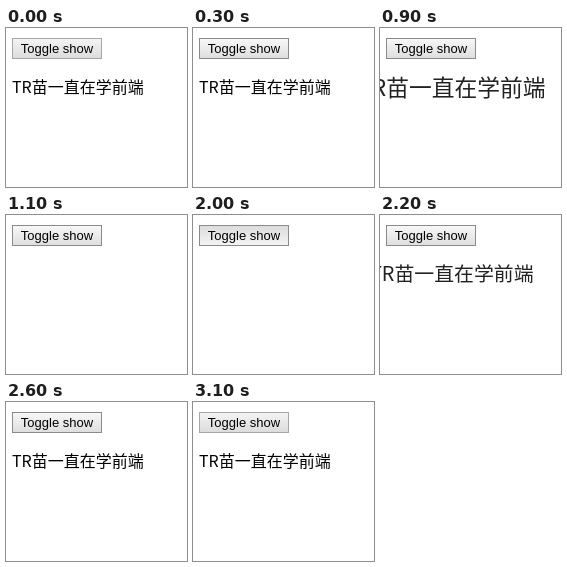
Write an HTML page that moves like this. It is 181x159 px and loops after 3900 ms.

```html
<!DOCTYPE html>
<html lang="zh-CN">
<head>
<meta charset="utf-8">
<title>Toggle show</title>
<style>
  html, body { margin: 0; width: 100%; height: 100%; overflow: hidden; background: #fff; }
  svg { display: block; width: 100vw; height: 100vh; }
  #button text { font: 13px "Liberation Sans", Arial, sans-serif; text-anchor: middle; }
  #label { font: 16px "Noto Sans CJK SC", "Noto Sans CJK", sans-serif; }
</style>
</head>
<body>
<svg viewBox="0 0 181 159">
  <defs>
    <linearGradient id="normal" x2="0" y2="1">
      <stop stop-color="#f4f4f4"/><stop offset="1" stop-color="#dcdcdc"/>
    </linearGradient>
    <linearGradient id="hover" x2="0" y2="1">
      <stop stop-color="#f8f8f8"/><stop offset="1" stop-color="#dedede"/>
    </linearGradient>
    <linearGradient id="pressed" x2="0" y2="1">
      <stop stop-color="#dcdcdc"/><stop offset="1" stop-color="#f4f4f4"/>
    </linearGradient>
  </defs>
  <g id="button">
    <rect id="face" x="6.5" y="10.5" width="89" height="20"/>
    <text x="51" y="25">Toggle show</text>
  </g>
  <text id="label" x="6" y="65">TR苗一直在学前端</text>
</svg>
<script>
const LOOP = 3900, STEP = 100;
const LENGTH = 500, RATE = 1.1;
const LEAVE = 609, ENTER = 2080;
const CENTER = [72, 59];
const face = document.getElementById('face');
const label = document.getElementById('label');

// CSS "ease": cubic-bezier(.25, .1, .25, 1)
function ease(x) {
  if (x <= 0) return 0;
  if (x >= 1) return 1;
  const curve = (s, a, b) => 3 * s * (1 - s) ** 2 * a + 3 * s * s * (1 - s) * b + s ** 3;
  let low = 0, high = 1;
  for (let i = 0; i < 24; i++) {
    const mid = (low + high) / 2;
    if (curve(mid, 0.25, 0.25) < x) low = mid; else high = mid;
  }
  return curve(low, 0.1, 1);
}

// Grows from 0 to 1.5, then settles at 1
function bounce(p) {
  return p < 0.5 ? 1.5 * ease(p * 2) : 1.5 - 0.5 * ease(p * 2 - 1);
}

function scaleAt(time) {
  const progress = start => Math.min(1, Math.max(0, (time - start) * RATE / LENGTH));
  return time < 2000 ? bounce(1 - progress(LEAVE)) : bounce(progress(ENTER));
}

function buttonState(time) {
  if (time < 300 || time >= 3100) return 'normal';
  return time === 600 || time === 2000 ? 'pressed' : 'hover';
}

function draw(ms) {
  const time = Math.floor((ms % LOOP) / STEP) * STEP;
  const scale = scaleAt(time);
  const state = buttonState(time);
  const [x, y] = CENTER;

  face.setAttribute('fill', `url(#${state})`);
  face.setAttribute('stroke', state === 'normal' ? '#a6a6a6' : '#8a8a8a');

  label.setAttribute('visibility', scale > 0.001 ? 'visible' : 'hidden');
  label.setAttribute('fill', scale === 1 ? '#000' : '#222');
  if (scale === 1) label.removeAttribute('transform');
  else label.setAttribute('transform', `translate(${x} ${y}) scale(${scale}) translate(${-x} ${-y})`);
}

const start = performance.now();
function tick() {
  draw(performance.now() - start);
  requestAnimationFrame(tick);
}
tick();
</script>
</body>
</html>
```
